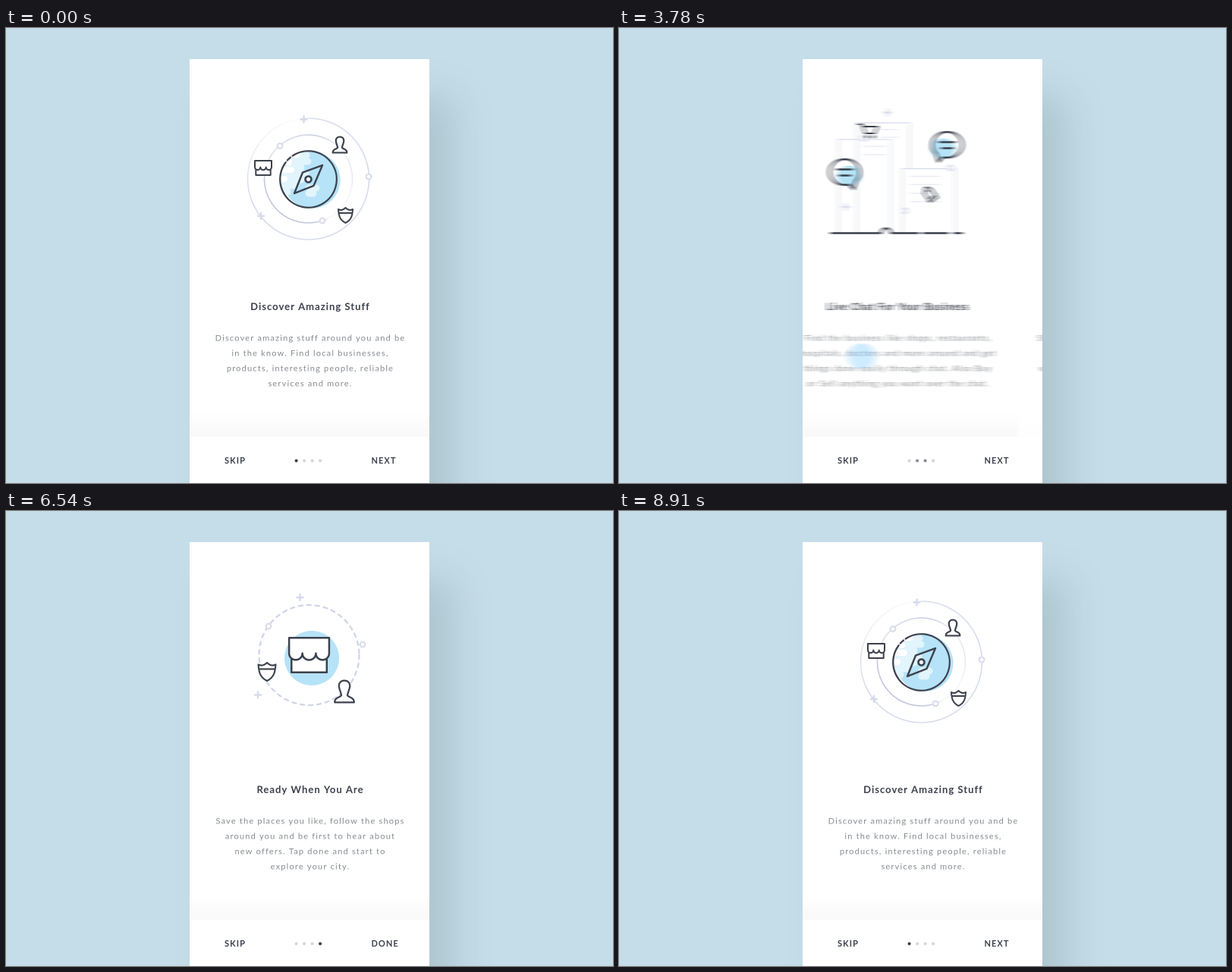
Recreate the animation shown at these times as an HTML page with a canvas. Size 800x600 px, loop 8940 ms.

```html
<!DOCTYPE html>
<html lang="en">
<head>
<meta charset="utf-8">
<title>Onboarding</title>
<style>
html, body { margin: 0; width: 100%; height: 100%; overflow: hidden; background: #c5dde9; }
#stage { position: absolute; left: 0; top: 0; width: 800px; height: 600px; overflow: hidden; perspective: 1111px; perspective-origin: 50% 50%; }
#card { position: absolute; left: 242px; top: 41px; width: 316px; height: 560px; box-shadow: 33px 50px 46px rgba(90, 120, 120, .22); }
#wipe { position: absolute; left: 0; top: 0; width: 800px; height: 600px; background: #a9cfe0; visibility: hidden; }
</style>
</head>
<body>
<div id="stage"><canvas id="card" width="632" height="1120"></canvas><div id="wipe"></div></div>
<script>
const LOOP = 8940, SWIPES = [1560, 3780, 5790], STEP = 315;
const INK = '#3c414d', GREY = '#868b91', PALE = '#d6daea', BLUE = '#b6e3f7';
const FONT = 'Lato, "Open Sans", sans-serif';
const card = document.getElementById('card'), wipe = document.getElementById('wipe');
const stage = document.getElementById('stage');

const COPY = [
  ['Discover Amazing Stuff', 'Discover amazing stuff around you and be', 'in the know. Find local businesses,', 'products, interesting people, reliable', 'services and more.'],
  ['Live Chat For Your Business', 'Find the business like shops, restaurants,', 'hospitals, doctors and more around and get', 'things done easily through chat. Also Buy', 'or Sell anything you want over the chat.'],
  ['Stay Connected with Friends', 'Share your special moments with your close', 'friends and family privately or with the', 'world. Connect with your friends and bring', 'them together in groups.'],
  ['Ready When You Are', 'Save the places you like, follow the shops', 'around you and be first to hear about', 'new offers. Tap done and start to', 'explore your city.']
];

const USER = 'M-5 6C-6 0-9-4-9-9C-9-15-5-18 0-18C5-18 9-15 9-9C9-4 6 0 5 6C6 10 16 9 16 18H-16C-16 9-6 10-5 6Z';
const STORE = 'M-11-9.5H11V-1a3.6 3.6 0 0 1-7.3 0a3.6 3.6 0 0 1-7.4 0a3.6 3.6 0 0 1-7.3 0ZM-9.7 2V9.5H9.7V2';
const SHIELD = 'M-9.5-8C-6-6-3-7 0-10C3-7 6-6 9.5-8C9 0 8 6 0 10C-8 6-9 0-9.5-8ZM-8.8-3H8.8';
const CART = 'M-13-8H-8L-4 4H8L12-5H-7';
const TAG = 'M-5.5-5L-1-10H2L5.5-5V9H-5.5ZM-3 5H3';

let g;
const clamp = x => Math.max(0, Math.min(1, x));
const lerp = (a, b, k) => a + (b - a) * k;
const smooth = x => { x = clamp(x); return x * x * (3 - 2 * x); };
const back = x => { x = clamp(x) - 1; return 1 + 2.4 * x * x * x + 1.4 * x * x; };

function at(x, y, sx, sy, rot, draw) {
  g.save();
  g.translate(x, y);
  g.rotate(rot);
  g.scale(sx, sy);
  draw();
  g.restore();
}

function shape(d, stroke, width, fill) {
  const p = typeof d === 'string' ? new Path2D(d) : d;
  if (fill) { g.fillStyle = fill; g.fill(p); }
  if (stroke) {
    g.strokeStyle = stroke;
    g.lineWidth = width;
    g.stroke(p);
  }
}

function disc(x, y, rx, ry = rx) {
  const p = new Path2D();
  p.ellipse(x, y, rx, ry, 0, 0, Math.PI * 2);
  return p;
}

const plus = (x, y) => shape(`M${x - 4} ${y}h8M${x} ${y - 4}v8`, PALE, 2.4);
const dot = (x, y) => shape(disc(x, y, 3.4), PALE, 2, '#fff');

function bars(list, color, width) {
  for (const [x0, x1, y] of list) shape(`M${x0} ${y}H${x1}`, color, width);
}

function icon(d, x, y, s = 1, width = 2, fill) {
  at(x, y, s, s, 0, () => shape(d, INK, width / (s || 1), fill));
}

function words(str, x, y, font, gap, color, align = 'center') {
  g.font = font + ' ' + FONT;
  g.letterSpacing = gap + 'px';
  g.fillStyle = color;
  g.textAlign = align;
  g.fillText(str, x, y);
}

function orbit(r, rgb, stops, width) {
  const grad = g.createConicGradient(0, 398.5, 199);
  for (const [pos, a] of stops) grad.addColorStop(pos, `rgba(${rgb},${a})`);
  shape(disc(398.5, 199, r), grad, width);
}

function bubble(x, y, sx, sy, rot, flip = 1) {
  at(x, y, sx, sy, rot, () => {
    const p = new Path2D();
    p.ellipse(0, -1, 20, 17, 0, 2.4, 1.85 + Math.PI * 2);
    p.lineTo(-11.5, 21.5);
    p.closePath();
    g.save();
    g.scale(flip, 1);
    shape(p, null, 0, '#fff');
    shape(disc(-6, 4, 16, 13.5), null, 0, BLUE);
    shape(p, INK, 2.5);
    g.restore();
    bars([[-10, 10, -4.5], [-7, 7.5, 3.5]], INK, 2.4);
  });
}

function compass() {
  orbit(80, '213,217,234', [[0, 1], [.25, .9], [.4, 1], [.5, .8], [.6, .35], [.735, .05], [.755, .85], [1, 1]], 1.5);
  orbit(58, '192,196,220', [[0, .35], [.08, .12], [.17, .15], [.22, .9], [.33, 1], [.5, .9], [.6, .5], [.72, .7], [.77, .9], [.86, .35], [1, .35]], 1.6);
  plus(392.5, 120.5); plus(336, 248);
  dot(361, 155.5); dot(478, 196); dot(417, 254);

  shape(disc(403, 200.5, 37.5), null, 0, BLUE);
  g.save();
  g.clip(disc(398.5, 199.5, 37));
  bars([[360, 396, 168], [360, 398, 176], [360, 389, 184], [360, 395, 192], [360, 389, 200], [360, 380, 208], [360, 371, 216], [399, 409, 211], [399, 405, 218]], '#e2f4fc', 9);
  bars([[360, 384, 167], [360, 373, 177], [360, 376, 187], [360, 367, 199]], '#fff', 8);
  g.restore();

  for (const [a, b] of [[236, 577], [222, 231]]) {
    const p = new Path2D();
    p.arc(398.5, 199.5, 37.3, a * Math.PI / 180, b * Math.PI / 180);
    shape(p, INK, 2.2);
  }
  shape('M417 181L391 190.5L380 218L405.5 208Z', INK, 2.4);
  shape(disc(398.5, 199.5, 4), INK, 2.6, '#eef8fd');
  icon(USER, 440, 154, .58, 2.2, '#fff');
  icon(STORE, 339, 184.5, 1, 2, '#fff');
  icon(SHIELD, 447.5, 247, 1, 2, '#fff');
}

function city(e) {
  const grow = back((e - 200) / 220), settle = smooth((e - 420) / 330);
  const turn = clamp((e - 250) / 400);
  g.save();
  g.globalAlpha = clamp((e - 150) / 600);
  for (const [x, y] of [[322.5, 147], [346.5, 125], [406.5, 185.5]]) shape(`M${x} 270V${y}h69.5V270`, PALE, 1.3, '#fff');
  shape('M391.5 147V270M346.5 147H391.5', PALE, 1.1);
  bars([[378, 400, 134], [378, 400, 144], [356, 384, 156], [356, 384, 167], [417, 455, 195.5], [417, 455, 206.5], [417, 455, 218], [417, 455, 229]], '#e6e9f3', 1.2);
  plus(387, 111.5); plus(332, 236);
  dot(356, 145.5); dot(470, 184.5); dot(410, 241);
  g.restore();

  const end = lerp(312, 486, clamp((e - 120) / 270));
  for (const [a, b] of [[313, 379], [392, 428.5], [434.5, 467], [475, 485.5]]) {
    if (end > a) shape(`M${a} 270.5H${Math.min(b, end)}`, INK, 2.4);
  }
  if (end > 385) shape('M379 270.5a6.4 6.4 0 0 1 13 0', INK, 2.4);

  g.save();
  g.globalAlpha = clamp(turn * 1.6);
  const s = lerp(.55, 1, turn);
  at(362, 135, s, s, -1.4 * (1 - turn), () => {
    shape(CART, INK, 2);
    shape(disc(-2, 8.5, 1.3), INK, 1.4);
    shape(disc(7, 8.5, 1.3), INK, 1.4);
  });
  at(443, 219, s, s, -.6, () => {
    shape(TAG, INK, 1.9);
    shape(disc(0, -5, 1.1), INK, 1.3);
  });
  g.restore();

  if (grow <= 0) return;
  bubble(lerp(lerp(400, 444.5, grow), 466, settle), lerp(lerp(185, 137, grow), 155, settle),
    grow * lerp(1.1, 1, settle), grow * lerp(1.28, 1, settle), -.06 * (1 - settle));
  const k = grow * lerp(.76, 1, settle);
  bubble(lerp(lerp(395, 365, grow), 331, settle), lerp(lerp(215, 200, grow), 191, settle), k, k, 1.4 * (1 - settle), -1);
}

function people(e) {
  g.save();
  g.globalAlpha = clamp((e - 60) / 400);
  shape('M339 122H451.5V185H339ZM339 203.5H451.5V266.5H339Z', '#dde0ee', 1.3);
  bars([[378.5, 433.5, 131.8], [378.5, 400, 142.5], [351, 439, 173], [384, 411, 212.5], [390, 411, 223.5], [351, 439, 254]], '#d9ddec', 2.8);
  g.setLineDash([5.2, 5.8]);
  shape(disc(399.5, 188, 52.5), '#cfd4e7', 2.2);
  g.setLineDash([]);
  plus(387.5, 112); plus(332, 242.5);
  dot(470, 191.5);
  g.restore();
  [[354.5, 149.5], [453.5, 184.5], [375.5, 238]].forEach(([x, y], i) => {
    const s = back((e - 120 - 60 * i) / 320);
    if (s > 0) icon(USER, x, y, s, 2.2, '#fff');
  });
  const s = back((e - 200) / 380);
  if (s > 0) bubble(399.5, 187.5, s, s, 0);
}

function market(e) {
  g.save();
  g.globalAlpha = clamp((e - 100) / 500);
  g.setLineDash([5.2, 5.8]);
  shape(disc(399.5, 190, 66), '#cfd4e7', 2.2);
  g.setLineDash([]);
  plus(387.5, 114); plus(332, 242.5);
  dot(470, 176); dot(346, 152);
  g.restore();
  const s = back((e - 150) / 400), u = back((e - 300) / 400);
  if (s > 0) {
    shape(disc(403, 194, 36 * s), null, 0, BLUE);
    icon(STORE, 399.5, 190, 2.4 * s, 2.5, '#fff');
  }
  if (u > 0) {
    icon(USER, 446, 238, .8 * u, 2.2, '#fff');
    icon(SHIELD, 344, 212, 1.2 * u, 2.1, '#fff');
  }
}

const ART = [compass, city, people, market];

function makeLayer() {
  const c = document.createElement('canvas');
  c.width = 632;
  c.height = 1120;
  return c;
}
const layers = [makeLayer(), makeLayer()];

function begin(canvas) {
  g = canvas.getContext('2d');
  g.setTransform(2, 0, 0, 2, -484, -82);
  g.globalAlpha = 1;
  g.lineCap = g.lineJoin = 'round';
}

function drawPage(canvas, n, age, shade) {
  begin(canvas);
  g.fillStyle = '#fff';
  g.fillRect(242, 41, 316, 560);
  const grad = g.createLinearGradient(0, 507, 0, 539);
  grad.addColorStop(0, 'rgba(0,0,0,0)');
  grad.addColorStop(1, `rgba(0,0,0,${.027 * shade})`);
  g.fillStyle = grad;
  g.fillRect(242, 507, 316, 32);
  ART[n](age);
  const [title, ...lines] = COPY[n];
  words(title, 401, 372, 'bold 13px', 1.02, INK);
  lines.forEach((s, i) => words(s, 401, 412.3 + 20.1 * i, '11px', 1.2, GREY));
}

const scroll = t => SWIPES.reduce((sum, s) => sum + smooth((t - s + 90) / 450), 0);
const touchX = r => 470 - 228 * smooth((r + 345) / 570);

function drawTouch(xs, y, r, alpha) {
  if (alpha <= 0) return;
  g.globalAlpha = 1 - Math.pow(1 - alpha, 1 / xs.length);
  for (const x of xs) shape(disc(x, y, r), null, 0, '#7ac7ff');
  g.globalAlpha = 1;
}

function drawFooter(t) {
  g.fillStyle = '#fff';
  g.fillRect(242, 539, 316, 62);
  const fades = SWIPES.map(s => clamp((t - s + 90) / 180));
  const active = fades.reduce((a, b) => a + b, 0);
  for (let i = 0; i < 4; i++) {
    const k = clamp(1 - Math.abs(active - i));
    const mix = (a, b) => Math.round(lerp(a, b, k));
    shape(disc(382.6 + 10.5 * i, 570.6, 2), null, 0, `rgb(${mix(212, 60)},${mix(214, 65)},${mix(218, 75)})`);
  }
  words('SKIP', 288, 574.7, 'bold 11px', 1.1, INK, 'left');
  g.globalAlpha = 1 - fades[2];
  words('NEXT', 481.5, 574.7, 'bold 11px', 1.05, INK, 'left');
  g.globalAlpha = fades[2];
  words('DONE', 481.5, 574.7, 'bold 11px', 1.05, INK, 'left');
  g.globalAlpha = 1;
}

function drawCard(t) {
  const p = scroll(t), n = Math.min(3, Math.floor(p)), part = p - n;
  const age = i => i ? t - SWIPES[i - 1] : 9999;
  drawPage(layers[0], n, age(n), 1);
  if (part > 0) drawPage(layers[1], n + 1, age(n + 1), part);

  begin(card);
  const count = part > 0 ? 10 : 1;
  for (let i = 0; i < count; i++) {
    const shift = count > 1 ? scroll(t + 15 * ((i + .5) / count - .5)) : p;
    const x = 242 - (shift - n) * STEP;
    g.globalAlpha = 1 / (i + 1);
    g.drawImage(layers[0], x, 41, 316, 560);
    if (part > 0) g.drawImage(layers[1], x + STEP, 41, 316, 560);
  }
  g.globalAlpha = 1;
  drawFooter(t);

  for (const s of SWIPES) {
    const r = t - s;
    if (r < -910 || r > 70) continue;
    const xs = Array.from({ length: 12 }, (_, i) => touchX(r + 28 * ((i + .5) / 12 - .5)));
    const grow = smooth((r + 910) / 250);
    drawTouch(xs, 432.7, 16.7 * lerp(.4, 1, grow), .9 * grow * (1 - clamp((r + 110) / 180)));
  }
  const tap = smooth((t - 6975) / 200);
  drawTouch([498], 570.5, 16.7 * lerp(.4, 1, tap), .7 * tap);
}

function render(t) {
  const open = clamp((t - 7200) / 450);
  const covered = t >= 7650;
  const k = covered ? smooth((t - 7950) / 400) : 1;
  stage.style.background = `rgb(${lerp(169, 197, k)},${lerp(207, 221, k)},${lerp(224, 233, k)})`;
  wipe.style.visibility = open > 0 && !covered ? 'visible' : 'hidden';
  wipe.style.clipPath = `circle(${770 * open * open}px at 498px 570px)`;

  card.style.visibility = covered && t < 7950 ? 'hidden' : 'visible';
  const left = covered ? Math.pow(1 - clamp((t - 7950) / 960), 2) : 0;
  card.style.transform = left > 0 ? `translate3d(0,${496 * left}px,${608 * left}px) rotateX(${80 * left}deg)` : 'none';
  drawCard(covered ? 0 : t);
}

const start = performance.now();
function tick() {
  render((performance.now() - start) % LOOP);
  requestAnimationFrame(tick);
}
tick();
</script>
</body>
</html>
```
